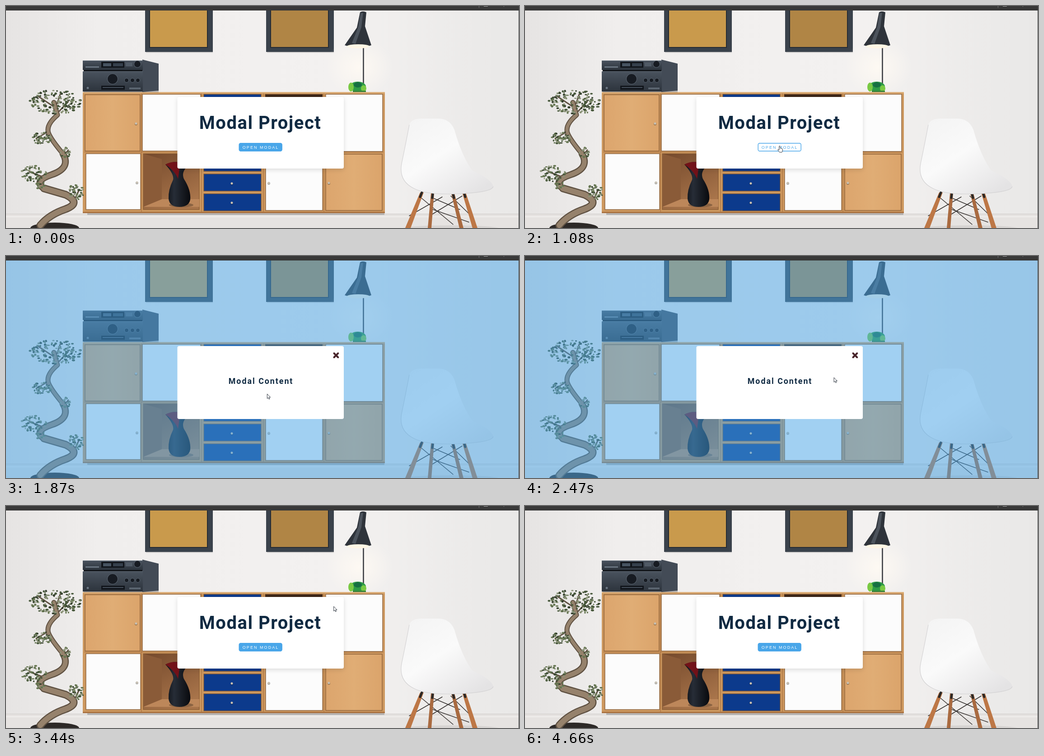
An HTML page that plays this animation: 1136x493 px, repeating every 5.79 s.

```html
<!DOCTYPE html>
<html lang="en">
<head>
<meta charset="utf-8">
<title>Modal Project</title>
<style>
  html, body { margin: 0; width: 100%; height: 100%; overflow: hidden; background: #f0efee; }
  svg { display: block; width: 100vw; height: 100vh; }
  .title, .content { font-family: Roboto, sans-serif; font-weight: 700; fill: #102a42; }
  .title { font-size: 40px; letter-spacing: 1.5px; }
  .content { font-size: 17.8px; letter-spacing: 2px; }
  .label { font: 9px "Liberation Sans", Arial, sans-serif; letter-spacing: 2.05px; }
  .card { filter: drop-shadow(0 3px 5px rgba(0, 0, 0, .13)); }
</style>
</head>
<body>
<svg viewBox="0 0 1136 493" preserveAspectRatio="none">
  <defs>
    <linearGradient id="wall">
      <stop offset="0" stop-color="#e6e4e3"/><stop offset=".18" stop-color="#f0eeed"/>
      <stop offset=".65" stop-color="#f3f1f0"/><stop offset="1" stop-color="#e9e8e7"/>
    </linearGradient>
    <linearGradient id="wood" x2="1">
      <stop offset="0" stop-color="#dca56d"/><stop offset=".5" stop-color="#e0ad75"/><stop offset="1" stop-color="#dba46b"/>
    </linearGradient>
    <linearGradient id="niche" x2=".5" y2="1">
      <stop offset="0" stop-color="#74492c"/><stop offset="1" stop-color="#a8744a"/>
    </linearGradient>
    <linearGradient id="seat" x2=".8" y2="1">
      <stop offset="0" stop-color="#f3f3f3"/><stop offset=".5" stop-color="#fafafa"/><stop offset="1" stop-color="#e4e3e4"/>
    </linearGradient>
    <linearGradient id="vase">
      <stop offset="0" stop-color="#0d0f14"/><stop offset=".35" stop-color="#272d37"/><stop offset="1" stop-color="#090a0e"/>
    </linearGradient>
    <linearGradient id="metal" x2="0" y2="1">
      <stop offset="0" stop-color="#4a535e"/><stop offset="1" stop-color="#2c333c"/>
    </linearGradient>
    <radialGradient id="glow">
      <stop offset="0" stop-color="#fffaf3" stop-opacity=".9"/><stop offset="1" stop-color="#fffaf3" stop-opacity="0"/>
    </radialGradient>
  </defs>

  <rect width="1136" height="493" fill="url(#wall)"/>
  <rect y="461" width="1136" height="2" fill="#d9d6d4"/>
  <rect y="463" width="1136" height="30" fill="#e6e3e1"/>
  <rect y="467" width="1136" height="2" fill="#f1efed"/>
  <g id="room"></g>

  <g id="page">
    <rect class="card" x="379.5" y="202" width="368.5" height="159" rx="4" fill="#fff"/>
    <text class="title" x="427.8" y="273">Modal Project</text>
    <rect id="button" x="516.2" y="304.7" width="95" height="17.6" rx="3.5" stroke="#49a6e9" stroke-width="1.4"/>
    <text id="label" class="label" x="523.8" y="316.7">OPEN MODAL</text>
  </g>

  <g id="modal" visibility="hidden">
    <rect y="10" width="1135" height="483" fill="#49a6e9" opacity=".5"/>
    <rect x="379.5" y="200" width="368.5" height="162" rx="4" fill="#fff"/>
    <text class="content" x="492.8" y="283.5">Modal Content</text>
    <path id="close" d="M726.5 216.2L735.3 225M735.3 216.2L726.5 225" stroke-width="4" stroke-linecap="round"/>
  </g>

  <rect width="1136" height="10" fill="#393939"/>
  <path d="M1047.5 0V4M1102.5 0V2" stroke="#777"/>
  <path d="M1058 .5H1067" stroke="#aaa"/>
  <path d="M1135.5 10V493" stroke="#4b4b4d"/>

  <g id="cursor" fill="#fff" stroke="#1d2530" stroke-width=".9" stroke-linejoin="round">
    <path id="arrow" d="M0 0V10.3L2.4 8.2L4 11.8L5.7 11L4.2 7.6H7.3Z"/>
    <path id="hand" d="M-1.2 8V1A1.2 1.2 0 0 1 1.2 1V5Q2.4 4.2 3.2 5.3Q4.4 4.8 5 6Q6.4 5.8 6.3 7.4V10Q6.1 12 5 13.8H-.4Q-1.5 11.8-3.6 9.6Q-4.8 8-3.7 7.4Q-2.6 7-1.2 9Z"/>
  </g>
</svg>

<script>
const $ = id => document.getElementById(id);
const rect = (x, y, x2, y2, fill, extra = '') =>
  `<rect x="${x}" y="${y}" width="${x2 - x}" height="${y2 - y}" fill="${fill}" ${extra}/>`;
const oval = (x, y, rx, ry, fill) => `<ellipse cx="${x}" cy="${y}" rx="${rx}" ry="${ry}" fill="${fill}"/>`;
const shape = (d, fill) => `<path d="${d}" fill="${fill}"/>`;
const line = (d, stroke, width) =>
  `<path d="${d}" fill="none" stroke="${stroke}" stroke-width="${width}" stroke-linecap="round" stroke-linejoin="round"/>`;
const knob = (x, y) => oval(x, y + 1, 3, 3, '#0005') + oval(x, y, 2.5, 2.5, '#c9c2b5');

function seeded(seed) {
  return () => (seed = (seed * 16807) % 2147483647) / 2147483647;
}

function picture(x, fill) {
  return rect(x + 2, 10, x + 150, 104, '#0002') + rect(x, 10, x + 150, 102, '#3a424b') +
    rect(x + 9, 10, x + 139, 93, '#262c34') + rect(x + 11, 10, x + 137, 91, fill);
}

function cabinet() {
  const blue = '#0c3a8c', white = '#fcfcfc', edge = '#a9713f';
  const door = (x, y, x2, y2, fill) => rect(x, y, x2, y2, fill, 'stroke="#80552f" stroke-width="1.2"');
  let out = rect(180, 456, 838, 464, '#0003') + rect(170, 191, 839, 460, '#cd985f') +
    rect(170, 191, 839, 194, '#dcae79') + rect(170, 457, 839, 460, edge);
  for (const x of [300, 433, 570, 704]) out += rect(x - .6, 194, x + .6, 457, edge);
  out += rect(173, 324, 836, 325, edge) +
    door(175, 197, 297, 322, 'url(#wood)') + door(302, 196, 431, 322, white) +
    door(438, 196, 565, 367, blue) + door(574, 196, 701, 322, '#3c2618') +
    door(708, 196, 834, 323, white) + door(177, 328, 298, 452, white) +
    door(304, 328, 428, 452, 'url(#niche)') + door(438, 373, 565, 411, blue) +
    door(438, 417, 565, 455, blue) + door(575, 329, 701, 454, white) +
    door(708, 329, 833, 454, 'url(#wood)');
  out += shape('M304 446L345 429H428V446Z', '#bd875a') + shape('M304 328L345 340V429L304 446Z', '#8a5b38');
  const knobs = [[288, 261], [290, 392], [500, 394], [500, 437], [582, 393], [715, 393]];
  return out + knobs.map(k => knob(...k)).join('');
}

function vase() {
  return oval(388, 442, 27, 5, '#0004') +
    shape('M353 352Q368 344 386 347L400 358Q388 370 394 384Q410 409 408 430Q405 446 384 446Q362 446 360 428Q359 408 370 386Q373 374 353 352Z', 'url(#vase)') +
    shape('M353 352Q366 344 386 347L381 384Q374 366 353 352Z', '#731219');
}

function stereo() {
  const dial = (x, y, r) => oval(x, y, r + 1, r + 1, '#59636f') + oval(x, y, r, r, '#171b22');
  return rect(172, 188, 338, 192, '#0003') +
    shape('M302 119L338 128V188L302 191Z', '#434b56') +
    rect(170, 121, 303, 142, 'url(#metal)') + rect(172, 142, 302, 146, '#12151a') + rect(170, 145, 303, 190, 'url(#metal)') +
    rect(170, 121, 303, 122, '#66717d') + rect(170, 145, 303, 146, '#66717d') +
    rect(211, 124, 262, 137, '#10141a') + rect(215, 127, 233, 134, '#465361') + rect(237, 127, 259, 134, '#35404c') +
    rect(176, 134, 206, 137, '#6a7581') + rect(265, 126, 280, 134, '#505a66') + dial(291, 129, 7) +
    dial(236, 162, 11) + [267, 280, 292].map(x => dial(x, 165, 4)).join('') +
    rect(211, 177, 263, 186, '#11151b') + rect(214, 180, 260, 182, '#46505c') +
    oval(181, 182, 2.5, 2.5, '#6b7682') + rect(273, 181, 298, 185, '#5b6570');
}

function lamp() {
  return oval(782, 135, 75, 65, 'url(#glow)') + line('M791.5 92V188', '#3a3d42', 2.6) +
    shape('M784 14Q790 10 798 14L795 45L809 87Q781 98 750 87L777 48Z', '#2f343b') +
    shape('M785 16L780 47L766 82L774 84L787 47L791 15Z', '#4d545d') +
    oval(780, 89.5, 25, 4.5, '#fff6e4');
}

function toy() {
  return oval(779, 179, 18, 11, '#2e9b45') + oval(764, 180, 6, 10, '#7ac943') + oval(792, 183, 6, 7, '#7ac943') +
    oval(779, 175, 9, 6, '#176f42') + rect(768, 188, 797, 191, '#39843c');
}

function chair() {
  const wood = '#bd7746', wire = '#35302e';
  return oval(985, 495, 110, 8, '#0001') +
    line('M917 424L990 485M1010 422L938 466M985 422L1030 466M942 425L1005 452M893 466L966 424M940 450L1025 480', wire, 1.5) +
    shape('M917 414H925L896 493H884ZM1010 414H1018L1044 493H1033Z', wood) +
    shape('M941 416H948L942 493H934ZM986 416H993L1013 493H1004Z', '#a96a40') +
    line('M921 414L917 424M1014 414L1017 424M945 418L944 426M990 418L992 426', '#2b2826', 5) +
    shape('M893 264Q897 250 920 250L958 250Q984 251 993 275Q1008 330 1032 365Q1077 386 1079 401Q1076 414 1000 417Q930 420 903 405Q869 388 876 350Q886 302 893 264Z', 'url(#seat)') +
    line('M893 264Q886 302 876 350Q869 388 903 405Q930 420 1000 417Q1076 414 1079 401', '#d4d3d4', 1.2);
}

function plant() {
  const bark = '#96826c', shade = '#5f5142', rnd = seeded(41);
  const low = 'M76 487Q96 463 132 451Q168 437 132 419L84 405';
  const mid = 'M84 405Q60 389 100 375Q145 360 126 328';
  const top = 'M126 328Q100 297 94 282Q88 264 114 242L106 214';
  const twigs = 'M112 240L138 212M108 225L72 201M95 278L67 294M125 335L138 320M88 382L52 368M150 434L162 408M113 217L120 196';
  let out = oval(108, 493, 54, 12, '#2d2927') + line(twigs, shade, 3) +
    [[low, 17], [mid, 15], [top, 11]].map(([d, w]) => line(d, shade, w)).join('') +
    [[low, 12], [mid, 10], [top, 7]].map(([d, w]) => line(d, bark, w)).join('');
  const clumps = [[110, 213, 57, 27, 150], [77, 292, 25, 14, 55], [62, 372, 28, 18, 60],
    [155, 413, 17, 18, 40], [132, 325, 12, 14, 18], [76, 398, 10, 8, 10]];
  const greens = ['#34402c', '#46573a', '#667652', '#8b9378'];
  for (const [x, y, w, h, count] of clumps) {
    for (let i = 0; i < count; i++) {
      const a = rnd() * 2 * Math.PI, r = Math.sqrt(rnd());
      out += oval((x + Math.cos(a) * r * w).toFixed(1), (y + Math.sin(a) * r * h).toFixed(1),
        (1.5 + rnd() * 2.2).toFixed(1), (1.2 + rnd() * 1.4).toFixed(1), greens[Math.floor(rnd() * 4)]);
    }
  }
  return out;
}

$('room').innerHTML = picture(308, '#c99a4c') + picture(576, '#b08545') + lamp() + cabinet() +
  vase() + stereo() + toy() + chair() + plant();

const LOOP = 5790, OPEN = 1210, SHUT = 3440;
const BLUE = [73, 166, 233], WHITE = [255, 255, 255], DARK = [72, 36, 42], RED = [230, 91, 91];

// time, x, y of the pointer tip
const path = [
  [320, 936, 448], [460, 800, 400], [600, 680, 348], [730, 600, 320], [870, 564, 311],
  [1800, 564, 311], [2340, 673, 275], [2470, 684, 270], [2740, 707, 244], [3020, 729, 219.5],
  [3310, 729, 219.5], [3440, 725.7, 223], [3630, 725.7, 223], [3770, 676, 270], [3980, 530, 326],
  [4240, 643, 327], [4450, 850, 405], [4660, 1046, 490]
];

const ramp = (t, from, to) => Math.min(1, Math.max(0, (t - from) / (to - from)));
const mix = (a, b, k) => `rgb(${a.map((v, i) => Math.round(v + (b[i] - v) * k))})`;

function pointer(t) {
  const i = Math.max(1, path.findIndex(p => p[0] > t));
  const [t0, x0, y0] = path[i - 1], [t1, x1, y1] = path[i], k = ramp(t, t0, t1);
  return [x0 + (x1 - x0) * k, y0 + (y1 - y0) * k];
}

const show = (id, on) => $(id).setAttribute('visibility', on ? 'visible' : 'hidden');

function draw(t) {
  const open = t >= OPEN && t < SHUT;
  const hover = t < OPEN ? ramp(t, 740, 940) : 0;
  $('button').setAttribute('fill', mix(BLUE, WHITE, hover));
  $('label').setAttribute('fill', mix(WHITE, BLUE, hover));
  $('close').setAttribute('stroke', mix(DARK, RED, ramp(t, 2950, 3200)));
  show('modal', open);
  show('page', !open);

  const moving = t >= 320 && t < 4660;
  const hand = (t >= 730 && t < 1870) || (t >= 2950 && t < SHUT);
  show('arrow', moving && !hand);
  show('hand', moving && hand);
  if (moving) $('cursor').setAttribute('transform', `translate(${pointer(t)})`);
}

const start = performance.now();
function tick() {
  draw((performance.now() - start) % LOOP);
  requestAnimationFrame(tick);
}
tick();
</script>
</body>
</html>
```
